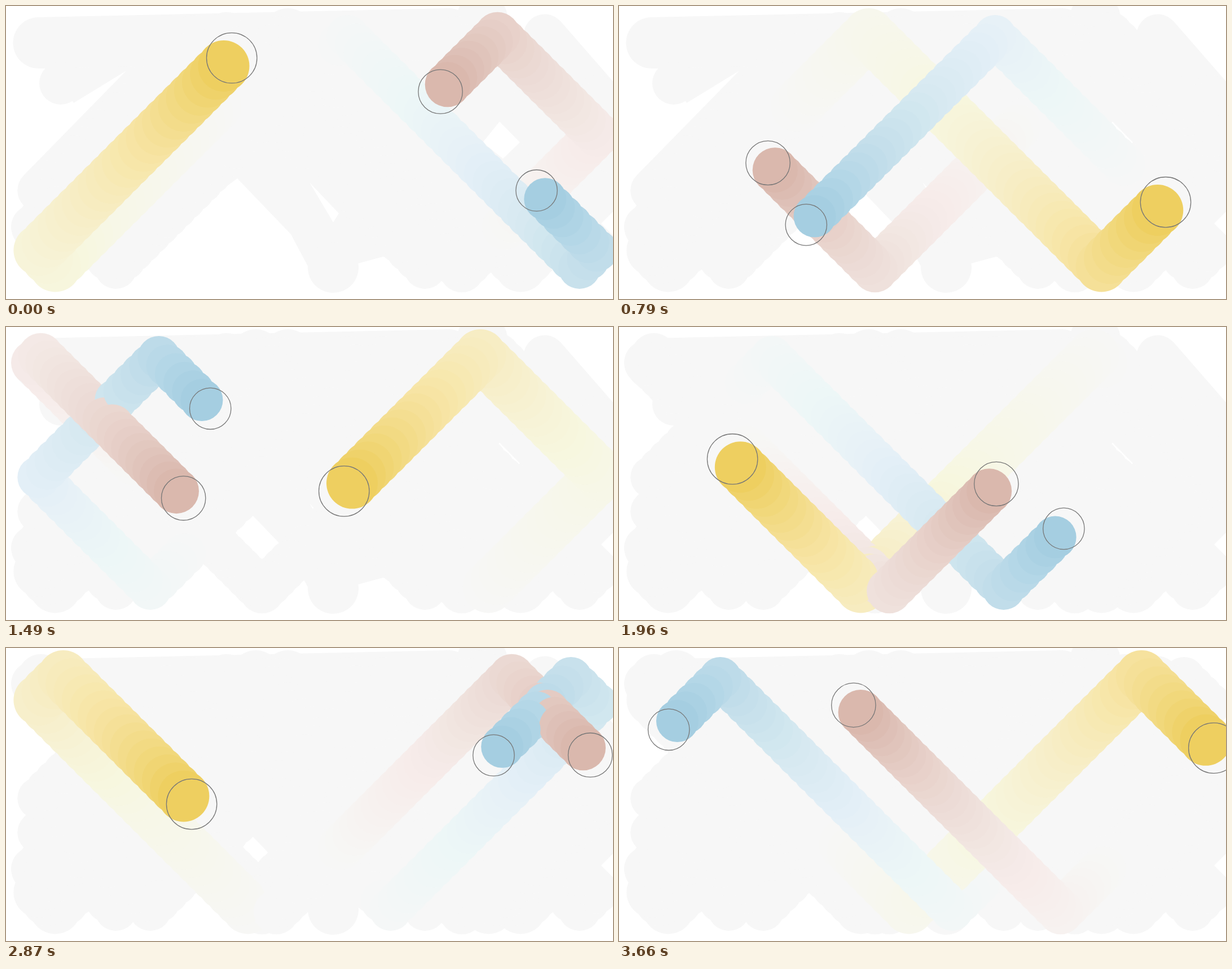
Write an HTML page with a canvas that moves like this. It is 1076x520 px and loops after 3.68 s.

```html
<!DOCTYPE html>
<html lang="en">
<head>
<meta charset="utf-8">
<title>Bouncing trails</title>
<style>
html, body { margin: 0; width: 100%; height: 100%; overflow: hidden; background: #fff; }
canvas { display: block; }
</style>
</head>
<body>
<canvas id="stage" width="1076" height="520"></canvas>
<script>
const ctx = document.getElementById('stage').getContext('2d');
const LOOP = 3680;
const FADE = 0.06;         // share of darkness lost per step
const GREY = '#f7f7f7';    // where fading comes to rest

// leftTurn/topTurn: step number of one turn at that wall; spanX/spanY: steps from wall to wall
const balls = [
  { rgb: [238, 207, 96], speed: 14.22, r: 44.7, first: -113,
    left: 58.9, leftTurn: 116, spanX: 70, top: 49.6, topTurn: 3, spanY: 29 },
  { rgb: [165, 206, 225], speed: 15.22, r: 36.7, first: -137,
    left: 57.8, leftTurn: 58, spanX: 65, top: 53.5, topTurn: 18, spanY: 27 },
  { rgb: [218, 184, 173], speed: 12.65, r: 39.2, first: -101,
    left: 49, leftTurn: 57, spanX: 79, top: 50.8, topTurn: 58, spanY: 33 }
];
const oldest = Math.min(...balls.map(b => b.first));

// Uneven pace: [time, steps done]
const pace = [[0, 0], [400, 18], [1140, 61], [1960, 106], [2420, 116],
  [2870, 135], [3310, 164], [3660, 186], [LOOP, 186]];

function stepAt(t) {
  const i = pace.findIndex(p => p[0] > t);
  const [t0, n0] = pace[i - 1], [t1, n1] = pace[i];
  const ticks = Math.max(1, Math.round((t1 - t0) / 52));
  const done = Math.floor((t - t0) / (t1 - t0) * ticks + 1e-6) / ticks;
  return Math.round(n0 + (n1 - n0) * done);
}

function triangle(n, span) {
  const m = ((n % (2 * span)) + 2 * span) % (2 * span);
  return Math.min(m, 2 * span - m);
}

function place(b, n) {
  return [b.left + b.speed * triangle(n - b.leftTurn, b.spanX),
          b.top + b.speed * triangle(n - b.topTurn, b.spanY)];
}

// Colour by age, in whole channel values
function fades(rgb) {
  const list = [];
  let dark = rgb.map(v => 255 - v);
  for (let i = 0; i < 60; i++) {
    list.push('rgb(' + dark.map(d => 255 - d).join(',') + ')');
    dark = dark.map(d => d - Math.round(d * FADE));
  }
  return list;
}
balls.forEach(b => { b.fades = fades(b.rgb); });

function circle(x, y, r) {
  ctx.beginPath();
  ctx.arc(x, y, r, 0, 2 * Math.PI);
}

function dot(x, y, r, color) {
  ctx.fillStyle = color;
  circle(x, y, r);
  ctx.fill();
}

function band(x1, y1, x2, y2, r) {
  ctx.strokeStyle = GREY;
  ctx.lineWidth = 2 * r;
  ctx.lineCap = 'round';
  ctx.beginPath();
  ctx.moveTo(x1, y1);
  ctx.lineTo(x2, y2);
  ctx.stroke();
}

// Grey left by earlier strokes, with two gaps
const ground = new Path2D(
  'M60 65L780 49 955 60 1050 161H1076V365L1055 386 1076 407V430L1017 460 668 445 583 468' +
  ' 550 490 505 405 410 306 195 465 145 468 88 462 48 392 57 327 31 301 213 115 120 172 97 137Z' +
  'M538 313L590 368 580 384Z' +
  'M875 205L911 242 881 271 845 242Z');

function drawGround() {
  ctx.fillStyle = GREY;
  ctx.fill(ground, 'evenodd');
  band(58, 65.5, 784, 49.5, 45.5);
  band(955, 52, 1050, 161, 37.5);
  dot(844, 22, 45, GREY);
  dot(97, 137, 38, GREY);
  dot(580, 464, 45, GREY);
}

function draw(t) {
  const now = stepAt(t);
  ctx.fillStyle = '#fff';
  ctx.fillRect(0, 0, 1076, 520);
  drawGround();
  for (let n = oldest; n < now; n++) {
    for (const b of balls) {
      if (n < b.first) continue;
      const age = Math.min(now - 1 - n, b.fades.length - 1);
      dot(...place(b, n), b.r + 0.8, b.fades[age]);
    }
  }
  ctx.strokeStyle = '#777';
  ctx.lineWidth = 1.3;
  for (const b of balls) {
    circle(...place(b, now), b.r);
    ctx.stroke();
  }
}

const start = performance.now();
function tick() {
  draw((performance.now() - start) % LOOP);
  requestAnimationFrame(tick);
}
tick();
</script>
</body>
</html>
```
